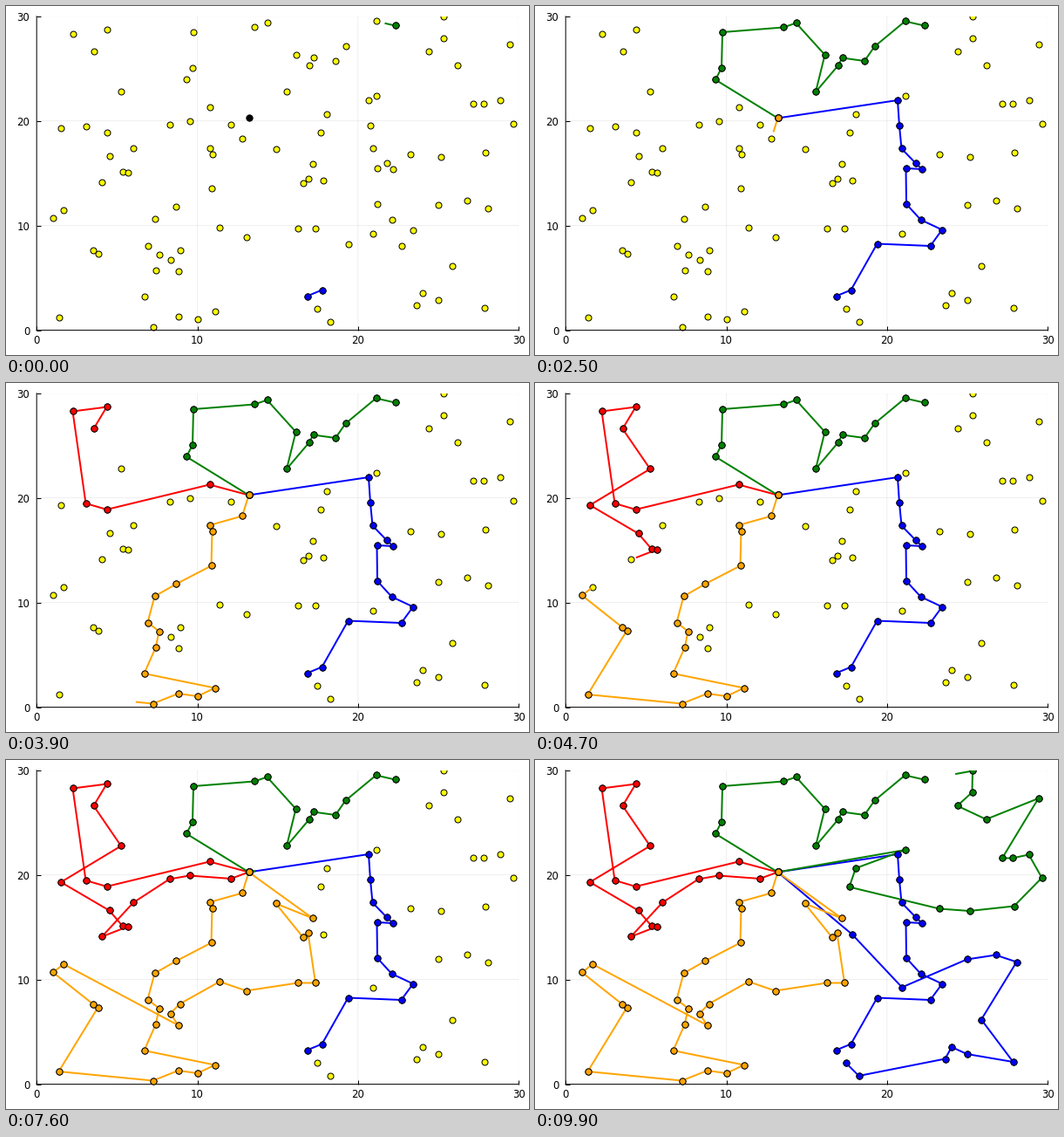
These frames come from a looping animation (600x400 px, 10000 ms). A matplotlib script:

```python
import numpy as np
import matplotlib.pyplot as plt
from matplotlib.animation import FuncAnimation

W, H, DPI = 600, 400, 72
LEFT, RIGHT, TOP, BOTTOM = 35.17, 588.19, 11.81, 371.61
FRAMES = 100
SPEED = 2.09  # plot units per frame
DEPOT = (279, 129)
LAYER = {"blue": 3.0, "red": 3.1, "green": 3.2, "orange": 3.3}

# Each trip: colour, departure frame, stops in stage pixels.
TRIPS = [
    ("blue", -0.54,
     [(346, 333), (363, 326), (393, 273), (454, 275.5), (467.5, 257),
      (443, 245.5), (426.5, 227.5), (426, 186.5), (444.5, 187.5),
      (437.5, 181), (421, 164), (418.5, 138), (416.5, 108.5), DEPOT]),
    ("green", -0.33,
     [(447, 23), (425, 18), (390, 47), (378.5, 63.5), (353, 60), (348, 69),
      (322.5, 99), (333, 56.5), (300, 20), (285.5, 25), (215.5, 30.5),
      (214.5, 71.5), (207.5, 85), DEPOT]),
    ("orange", 24.35,
     [DEPOT, (271.5, 153), (234, 163.5), (237, 170), (236, 210),
      (195.5, 231), (171, 245), (163, 275), (176, 285), (172.5, 303),
      (159, 333.5), (240, 350), (220.5, 359.5), (198, 356.5), (169, 368),
      (61, 357.5), (106, 284), (100, 280), (54.5, 244), (66.5, 234.5),
      (198, 304.5), (189, 291), (200, 280), (245.5, 254.5), (276, 265),
      (335, 256), (355.5, 256), (347, 199), (341.5, 204), (310, 165),
      (352.5, 182), DEPOT]),
    ("red", 27.4,
     [DEPOT, (234, 117), (116, 145.5), (92, 138.5), (77, 33), (116, 28),
      (101, 53), (132.5, 99), (63.5, 140.5), (119, 173), (134, 190.5),
      (140, 191.5), (110.5, 203), (146.5, 164), (188, 137), (211, 133),
      (258.5, 136.5), DEPOT]),
    ("green", 75.8,
     [DEPOT, (425.5, 103.5), (368.5, 124.5), (361, 146), (464.5, 171),
      (499, 173.5), (550, 168), (582, 135.5), (567, 109), (548, 113),
      (536.5, 113), (578, 44.5), (518, 68.5), (485, 53), (502, 37.5),
      (502.5, 13), (447, 23)]),
    ("blue", 77.62,
     [DEPOT, (364.5, 200.5), (421.5, 261), (496, 229), (529, 224),
      (553, 232), (512.5, 298), (549, 346.5), (496, 337.5), (478.5, 329.5),
      (471, 343), (372, 362.5), (357, 347.5)]),
]


def to_units(pixels):
    """Stage pixels to plot units; readings sit half a pixel low and right."""
    x, y = np.array(pixels, float).T - 0.5
    return np.c_[(x - LEFT) / (RIGHT - LEFT), (BOTTOM - y) / (BOTTOM - TOP)] * 30


def dots(points, color, size, z):
    # scatter keeps sub-pixel centres, unlike plot markers
    return ax.scatter(*np.array(points).T, s=size ** 2, color=color,
                      edgecolors="black", linewidths=1, zorder=z)


class Trip:
    def __init__(self, color, start, pixels):
        self.start = start
        self.stops = to_units(pixels)
        steps = np.hypot(*np.diff(self.stops, axis=0).T)
        self.dist = np.r_[0, np.cumsum(steps)]
        z = LAYER[color]
        self.line = ax.plot([], [], color=color, lw=2, zorder=z,
                            solid_capstyle="butt", solid_joinstyle="round")[0]
        self.dots = dots(self.stops, color, 7.3, z + 1)

    def draw(self, frame):
        s = min((frame - self.start) * SPEED, self.dist[-1])
        seen = self.stops[self.dist <= s]
        path = seen
        if len(seen):
            head = [np.interp(s, self.dist, axis) for axis in self.stops.T]
            path = np.vstack([seen, head])
        self.line.set_data(*path.T)
        self.dots.set_offsets(seen)


plt.rcParams.update({"font.family": "DejaVu Sans", "path.snap": False})
fig = plt.figure(figsize=(W / DPI, H / DPI), dpi=DPI, facecolor="white")
ax = fig.add_axes([LEFT / W, 1 - BOTTOM / H, (RIGHT - LEFT) / W, (BOTTOM - TOP) / H])
ax.set(xlim=(0, 30), ylim=(0, 30), xticks=range(0, 31, 10), yticks=range(0, 31, 10))
ax.tick_params(direction="in", length=5, width=1, labelsize=11.7)
ax.tick_params(axis="x", pad=5)
ax.tick_params(axis="y", pad=8)
ax.grid(color="black", alpha=0.1, lw=0.6)
ax.set_axisbelow(True)
ax.spines[["top", "right"]].set_visible(False)
ax.spines[["left", "bottom"]].set_linewidth(1)

customers = {p for *_, stops in TRIPS for p in stops} - {DEPOT}
dots(to_units(sorted(customers)), "yellow", 7, 2)
dots(to_units([DEPOT]), "black", 7.3, 2.5)
trips = [Trip(*spec) for spec in TRIPS]


def update(frame):
    for trip in trips:
        trip.draw(frame)
    return [a for trip in trips for a in (trip.line, trip.dots)]


anim = FuncAnimation(fig, update, frames=FRAMES, interval=100,
                     init_func=lambda: update(0), repeat=True,
                     repeat_delay=0, blit=False)
plt.show()
```
